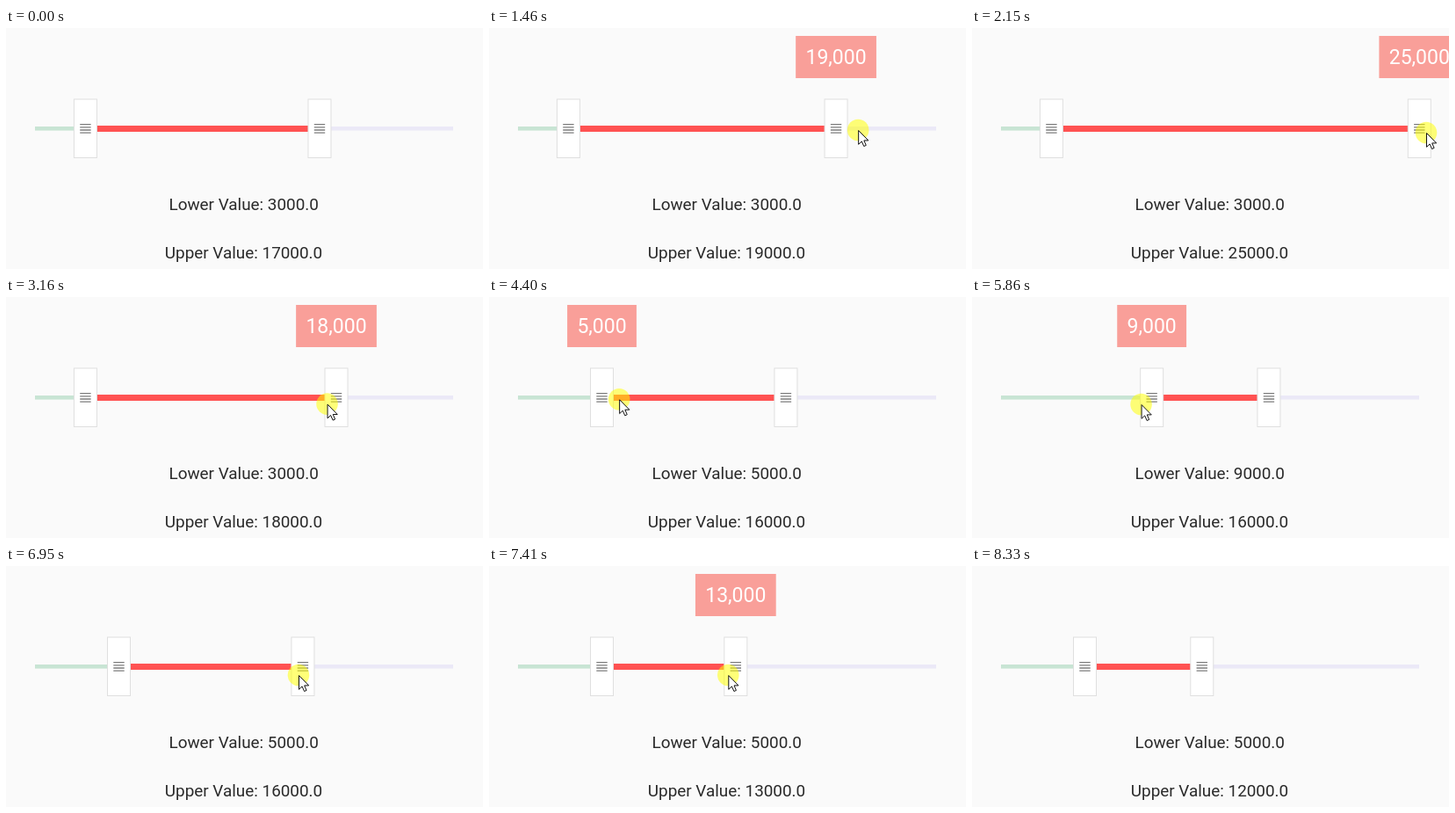
An HTML page for the animation above (8880 ms loop, 543x274 px).

```html
<!DOCTYPE html>
<html lang="en">
<head>
<meta charset="utf-8">
<title>Range slider</title>
<style>
  html, body { margin: 0; width: 100%; height: 100%; overflow: hidden; background: #fafafa; }
  svg { display: block; width: 543px; height: 274px; font-family: Roboto, sans-serif; }
  text { text-anchor: middle; }
  .label { font-size: 18.9px; fill: #2a2a2a; }
  #tip rect { fill: #f99f99; }
  #tip text { font-size: 23px; fill: #fff; }
  .box { fill: #fff; stroke: #dfdfdf; }
  .icon { stroke: #7c7c7c; stroke-width: 1.3; }
</style>
</head>
<body>
<svg viewBox="0 0 543 274">
  <defs>
    <g id="thumb">
      <rect class="box" x="-13" y="81" width="26" height="66.5"/>
      <path class="icon" d="M-6.2 109.6h12.4m-12.4 3.2h12.4m-12.4 3.2h12.4m-12.4 3.2h12.4"/>
    </g>
  </defs>
  <rect id="before" y="112" height="4.6" fill="#c8e4d4"/>
  <rect id="after" y="112" height="4.6" fill="#ebe9f7"/>
  <rect id="range" y="111" height="7" fill="#ff5252"/>
  <g id="thumbs">
    <use id="low" href="#thumb"/>
    <use id="high" href="#thumb"/>
  </g>
  <g id="tip">
    <rect y="9" height="48"/>
    <text y="41.2"></text>
  </g>
  <text id="lowText" class="label" x="270.7" y="206.7"></text>
  <text id="highText" class="label" x="270.5" y="262.2"></text>
  <g id="cursor">
    <circle id="press" r="12.3" fill="#ff0" fill-opacity=".53"/>
    <path d="M.5 .5V16.3L4.1 12.9L6.6 18.5L9.1 17.4L6.7 11.9H11.7Z" fill="#fff" stroke="#111" stroke-linejoin="round"/>
  </g>
</svg>
<script>
const LOOP = 8880, STEP = LOOP / 115, LAG = 50;
const LEFT = 33, RIGHT = 509, UNIT = 19.04;

// Pointer strokes; low or high is the value that handle is dragged to, in thousands
const strokes = [
  { from: 150, to: 760, x: 362, y: 116 },
  { from: 910, to: 1110, x: 344, y: 116, high: 16 },
  { from: 1110, to: 1770, x: 484, y: 116, high: 22 },
  { from: 1770, to: 2150, x: 517, y: 119, high: 25 },
  { from: 2550, to: 3340, x: 342, y: 122, high: 16 },
  { from: 3390, to: 3790, x: 91, y: 115 },
  { from: 4140, to: 5060, x: 398, y: 122, low: 16 },
  { from: 5400, to: 6080, x: 126, y: 122, low: 5 },
  { from: 6080, to: 6500, x: 328, y: 124 },
  { from: 6720, to: 6950, x: 333, y: 124 },
  { from: 6950, to: 7490, x: 268, y: 124, high: 12 },
  { from: 7720, to: 8330, x: 420, y: 276 }
];
const rest = { x: 454, y: 244, low: 3, high: 17 };

// One entry per drag: press, tooltip shown, release
const drags = [
  { down: 905, tip: 1060, up: 3380, key: 'high' },
  { down: 3930, tip: 4090, up: 6150, key: 'low' },
  { down: 6710, tip: 7010, up: 7710, key: 'high' }
];

const el = {};
for (const node of document.querySelectorAll('svg [id]')) el[node.id] = node;
const [tipBox, tipText] = el.tip.children;

const show = (node, on) => node.setAttribute('visibility', on ? 'visible' : 'hidden');
const move = (node, x, y = 0) => node.setAttribute('transform', `translate(${x} ${y})`);
const place = value => LEFT + 0.3 + value * UNIT;

function span(node, a, b) {
  node.setAttribute('x', a);
  node.setAttribute('width', Math.max(0, b - a));
}

// Run a property through every stroke that sets it
function at(key, t) {
  let value = rest[key];
  for (const s of strokes) {
    if (!(key in s) || t < s.from) continue;
    const u = Math.min(1, (t - s.from) / (s.to - s.from));
    value += (s[key] - value) * u * u * (3 - 2 * u);
  }
  return value;
}

function draw(time) {
  const t = (Math.floor(time / STEP + 0.2) - 0.1) * STEP;
  const value = {}, x = {};
  for (const key of ['low', 'high']) {
    value[key] = Math.round(at(key, t - LAG));
    x[key] = place(value[key]);
    move(el[key], x[key]);
    el[key + 'Text'].textContent =
      `${key === 'low' ? 'Lower' : 'Upper'} Value: ${value[key]}000.0`;
  }
  span(el.before, LEFT, x.low);
  span(el.range, x.low, x.high);
  span(el.after, x.high, RIGHT);

  const drag = drags.find(d => t >= d.down && t < d.up);
  show(el.press, drag);
  show(el.tip, drag && t >= drag.tip);
  if (drag) {
    el.thumbs.append(el[drag.key]);
    tipText.textContent = `${value[drag.key]},000`;
    const half = tipText.getComputedTextLength() / 2 + 11.3;
    span(tipBox, -half, half);
    move(el.tip, x[drag.key]);
  }

  move(el.cursor, at('x', t), at('y', t));
  el.cursor.style.display = t > 140 && t < 8320 ? '' : 'none';
}

const began = performance.now();
function tick() {
  draw((performance.now() - began) % LOOP);
  requestAnimationFrame(tick);
}
tick();
</script>
</body>
</html>
```
